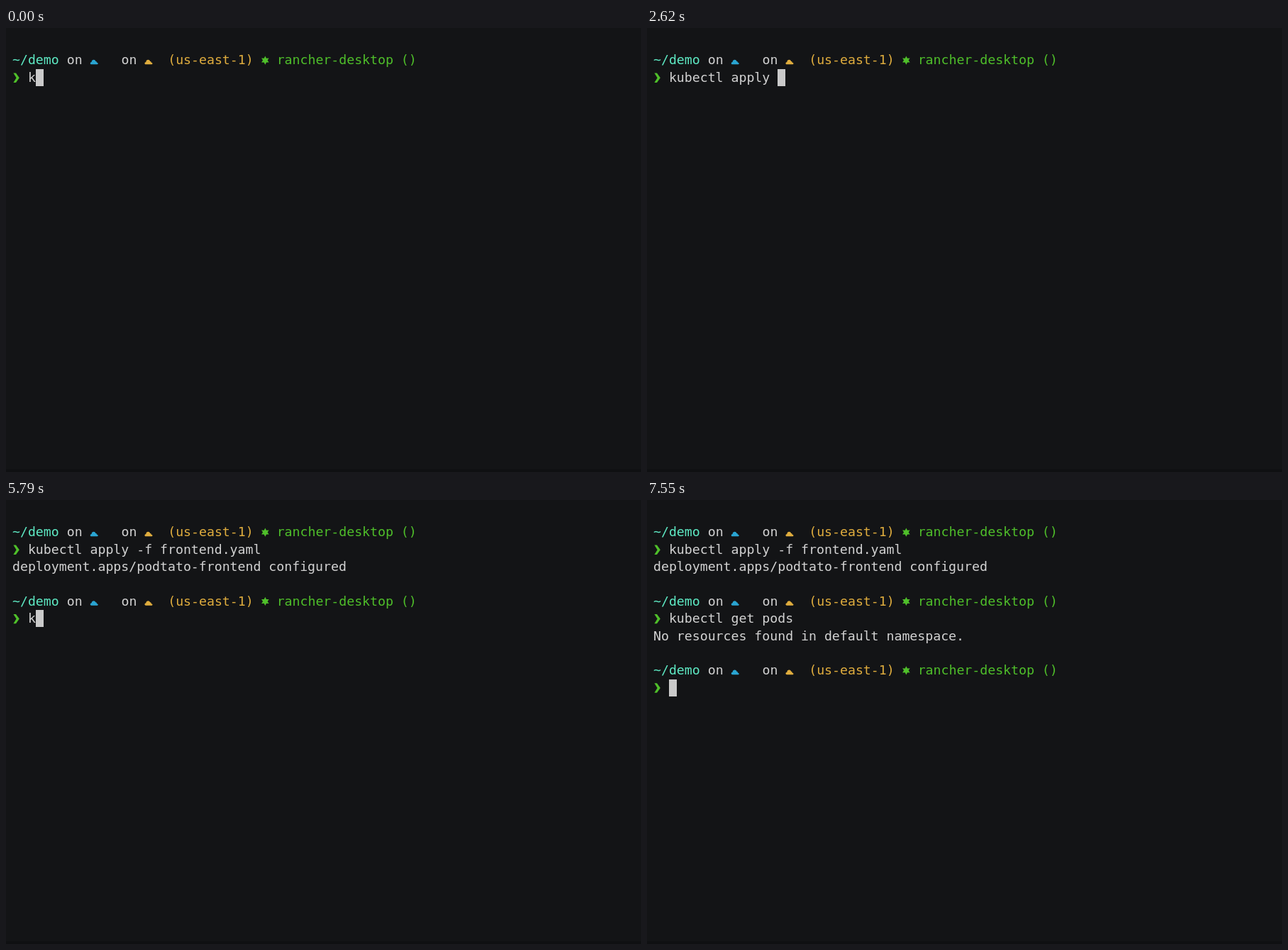
These frames come from a looping animation (895 by 626 pixels, 8000 ms). An HTML page with a canvas:

```html
<!DOCTYPE html>
<html lang="en">
<head>
<meta charset="utf-8">
<title>Terminal session</title>
<style>
  html, body { margin: 0; width: 100%; height: 100%; overflow: hidden; background: #131416; }
  canvas { display: block; }
</style>
</head>
<body>
<canvas id="stage" width="895" height="626"></canvas>
<script>
const ctx = document.getElementById("stage").getContext("2d", { alpha: false });
const LOOP = 8000, ORIGIN = 9, CELL_W = 10.96, CELL_H = 24.35;
const COLOR = {
  back: "#131416", edge: "#0f1012", text: "#d2d2d2", cursor: "#cacaca",
  cyan: "#5eeac4", blue: "#2aa5d2", yellow: "#e0ad3e", green: "#4fbf2a"
};

// Key times for a run of evenly spaced keystrokes
const keys = (from, to, count) =>
  Array.from({ length: count }, (_, i) => from + (to - from) * i / (count - 1));

const commands = [
  {
    row: 1, shown: 0, entered: 4200, done: 4530,
    text: "kubectl apply -f frontend.yaml",
    output: "deployment.apps/podtato-frontend configured",
    strokes: [0, ...keys(130, 450, 4), 650, 780, ...keys(1240, 1560, 4),
      1760, 1960, 2620, 2750, 2950, 3010, 3270, ...Array(12).fill(3800)]
  },
  {
    row: 5, shown: 4530, entered: 7360, done: 7550,
    text: "kubectl get pods",
    output: "No resources found in default namespace.",
    strokes: [5790, ...keys(5980, 6300, 4), ...keys(6490, 6870, 5), ...keys(6930, 7230, 6)]
  },
  { row: 9, shown: 7550, entered: Infinity, text: "", strokes: [] }
];

const colX = col => ORIGIN + col * CELL_W;
const rowY = row => ORIGIN + row * CELL_H;

function write(text, col, row, color = COLOR.text) {
  ctx.fillStyle = color;
  ctx.fillText(text, colX(col), Math.round(rowY(row) + 18.1));
}

function polygon(points, color) {
  ctx.fillStyle = color;
  ctx.beginPath();
  points.forEach(([x, y]) => ctx.lineTo(x, y));
  ctx.fill();
}

function cloud(col, row, color) {
  const x = colX(col), y = rowY(row) + 18;
  ctx.fillStyle = color;
  ctx.beginPath();
  ctx.moveTo(x + 1.8, y);
  ctx.bezierCurveTo(x - 0.6, y, x - 0.2, y - 3.4, x + 2, y - 3.4);
  ctx.bezierCurveTo(x + 2, y - 7.4, x + 7.2, y - 7.6, x + 7.7, y - 4.4);
  ctx.bezierCurveTo(x + 9.3, y - 4.6, x + 9.6, y - 3, x + 9.2, y - 2.5);
  ctx.bezierCurveTo(x + 11.8, y - 2.5, x + 11.6, y, x + 9.8, y);
  ctx.fill();
}

function star(col, row, color) {
  const x = colX(col) + 5.6, y = rowY(row) + 12.2;
  polygon(Array.from({ length: 12 }, (_, i) => {
    const radius = i % 2 ? 3.3 : 6.1, angle = i * Math.PI / 6 - Math.PI / 2;
    return [x + radius * Math.cos(angle), y + radius * Math.sin(angle)];
  }), color);
}

function prompt(row) {
  write("~/demo", 0, row, COLOR.cyan);
  write("on", 7, row);
  cloud(10, row, COLOR.blue);
  write("on", 14, row);
  cloud(17, row, COLOR.yellow);
  write("(us-east-1)", 20, row, COLOR.yellow);
  star(32, row, COLOR.green);
  write("rancher-desktop ()", 34, row, COLOR.green);
  const x = ORIGIN, y = rowY(row + 1) + 12.5;
  polygon([[x + 1.4, y - 6.7], [x + 5, y - 6.7], [x + 9.8, y],
    [x + 5, y + 6.7], [x + 1.4, y + 6.7], [x + 5.6, y]], COLOR.green);
}

function cursor(col, row) {
  const x = Math.round(colX(col)), y = Math.round(rowY(row));
  ctx.fillStyle = COLOR.cursor;
  ctx.fillRect(x, y, 11, 24);
}

function draw(time) {
  ctx.fillStyle = COLOR.back;
  ctx.fillRect(0, 0, 895, 626);
  ctx.fillStyle = COLOR.edge;
  ctx.fillRect(0, 622, 895, 4);
  ctx.font = '18.2px "DejaVu Sans Mono", monospace';

  for (const command of commands) {
    if (time < command.shown) break;
    const typed = command.strokes.filter(stroke => stroke <= time).length;
    prompt(command.row);
    write(command.text.slice(0, typed), 2, command.row + 1);
    if (time < command.entered) cursor(2 + typed, command.row + 1);
    else if (time < command.done) cursor(0, command.row + 2);
    else write(command.output, 0, command.row + 2);
  }
}

function tick() {
  draw(performance.now() % LOOP);
  requestAnimationFrame(tick);
}
tick();
</script>
</body>
</html>
```
